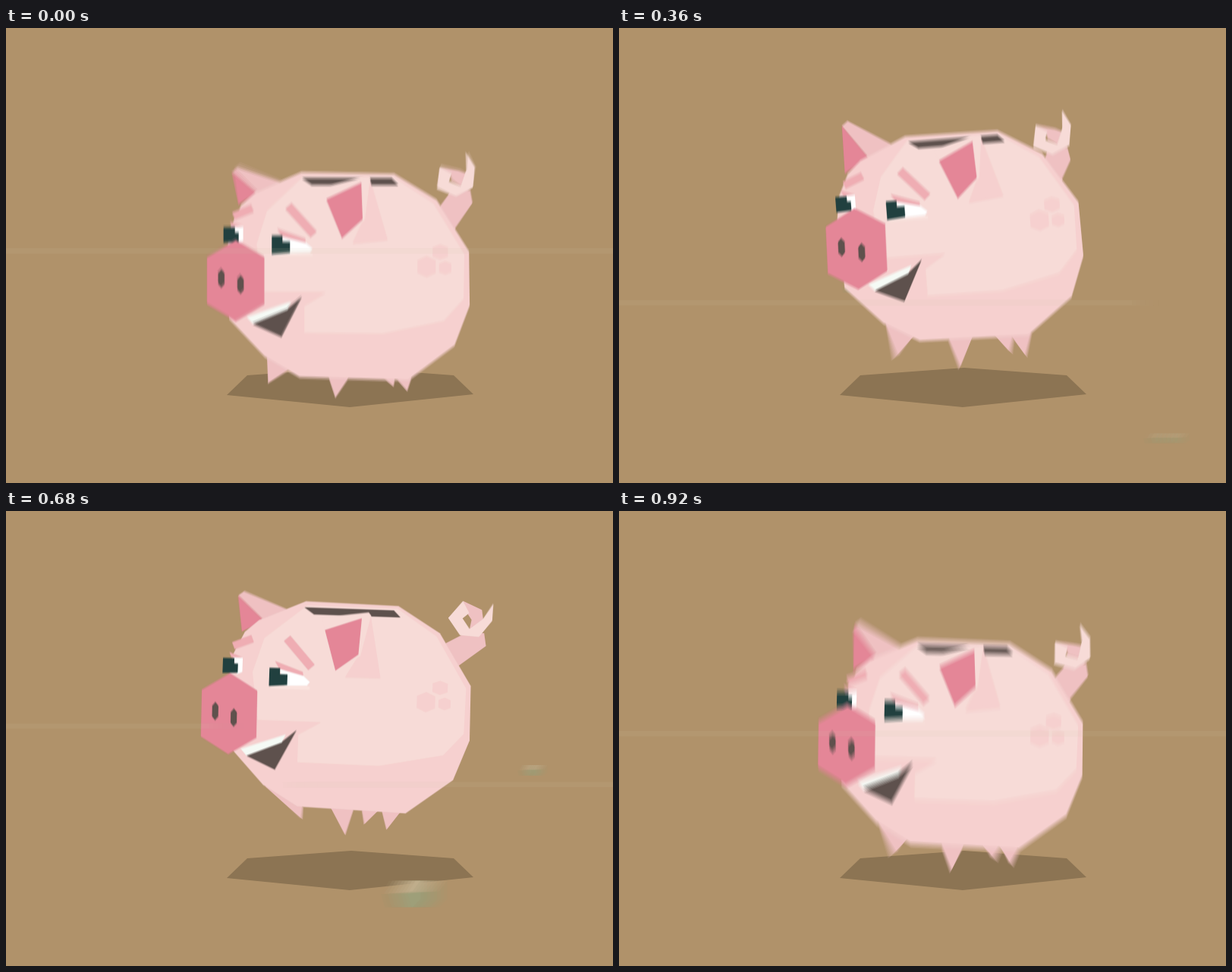
An HTML page with a canvas that plays this animation: 800 px wide and 600 px high, repeating every 0.96 s.

```html
<!DOCTYPE html>
<html lang="en">
<head>
<meta charset="utf-8">
<title>Running piggy bank</title>
<style>
  html, body { margin: 0; width: 100%; height: 100%; overflow: hidden; background: #b0926a; }
  canvas { display: block; width: 800px; height: 600px; }
</style>
</head>
<body>
<canvas id="stage" width="800" height="600"></canvas>
<script>
const LOOP = 960, HOP = LOOP / 2, STEP = 40, SHUTTER = 20, SAMPLES = 9;
const out = document.getElementById('stage').getContext('2d');
const buffer = document.createElement('canvas');
buffer.width = 800;
buffer.height = 600;
const ctx = buffer.getContext('2d');

const C = {
  ground: '#b0926a', shade: '#8c7453', skin: '#f6d0cf', light: '#f7dbd7',
  fold: '#efc1c2', rose: '#e48697', brow: '#efadb3', dark: '#5e514d', eye: '#21403f'
};
const wrap = t => ((t % LOOP) + LOOP) % LOOP;
const rad = deg => deg * Math.PI / 180;
const mix = (a, b, k) => a + (b - a) * k;
const clamp = (v, lo, hi) => Math.max(lo, Math.min(hi, v));

// Two hops per loop, the first tipping forward and the second back
function poseAt(t) {
  const u = (t % HOP) / HOP, cycle = 2 * Math.PI / LOOP;
  return {
    lift: 4 * u * (1 - u),
    tilt: (t < HOP ? -32 : 20) * u * u * (1 - u),
    nod: 12 * u * (1 - u) * (0.75 - u),
    flap: 12.7 * u ** 4 * (1 - u),
    turn: Math.sin(cycle * (t - 20)),
    stride: Math.cos(5 * cycle * t)
  };
}

function poly(color, ...p) {
  ctx.fillStyle = color;
  ctx.beginPath();
  for (let i = 0; i < p.length; i += 2) ctx.lineTo(p[i], p[i + 1]);
  ctx.closePath();
  ctx.fill();
}

function rect(color, x, y, w, h) {
  ctx.fillStyle = color;
  ctx.fillRect(x, y, w, h);
}

function hexagon(color, x, y, rx, ry) {
  const s = ry * 0.58;
  poly(color, x, y - ry, x + rx, y - s, x + rx, y + s, x, y + ry, x - rx, y + s, x - rx, y - s);
}

function group(draw, x, y, deg = 0, cx = 0, cy = 0, sx = 1) {
  ctx.save();
  ctx.translate(cx + x, cy + y);
  ctx.rotate(rad(deg));
  ctx.scale(sx, 1);
  ctx.translate(-cx, -cy);
  draw();
  ctx.restore();
}

const bar = (color, x, y, w, h, deg) =>
  group(() => rect(color, -w / 2, -h / 2, w, h), x, y, deg);

function drawRock(x, y, w, h) {
  const l = x - w / 2, r = x + w / 2, top = y - h / 2, end = y + h / 2;
  poly('#9e9f79', l, y, l + w * 0.2, top, r, top, r, y + h * 0.2, r - w * 0.2, end, l + w * 0.1, end);
  poly('#bfad8b', l, y, l + w * 0.2, top, r, top, r - w * 0.2, y - h * 0.1);
}

function drawRocks(t) {
  drawRock(1.19 * (t - 97), 342, 18, 14);
  drawRock(2.29 * (t - 45), 541, 20, 13);
  drawRock(1.97 * (t - 407), 505, 52, 35);
}

// A streak grows from the left edge, then leaves to the right
function drawStreak(t, base) {
  const head = Math.min(800, (t - 86) * 2.55), tail = Math.max(0, (t - 528) * 2.55);
  const y = base - 1.15e-4 * (t - 500) ** 2;
  if (head > tail) rect('rgba(205,196,166,.1)', tail, y - 3.8, head - tail, 7.6);
}

function drawTail({ lift, tilt, nod }) {
  const x = 594 + 10 * nod + 2.2 * tilt, y = 196 + 11 * lift, coil = 1 - nod;
  poly(C.fold, 564, 245, x - 8, y + 18, x + 17, y + 17, x + 20, y + 34, 584, 275);
  group(() => {
    // The loop closes as the tail curls up
    poly(C.fold, -11, -25, mix(14, 7, coil), mix(-13, -6, coil), 16, 8, -3, 12,
      mix(0, -9, coil), 0, -6, -9);
    poly(C.light, -11, -25, -31, -3, -16, 20, 9, 23, 27, 2, 29, -21, 15, -1, -3, 12, -12, -2, -3, -9);
  }, x, y, -36 * coil - tilt);
}

function drawLeg(x, reach, swing, { lift, flap, stride }) {
  poly(C.fold, x - 26, 436, x + swing * stride, reach + 8 * (lift + flap), x + 26, 436);
}

function drawLegs(pose) {
  drawLeg(370, 468, -25, pose);
  drawLeg(443, 487, -9, pose);
  drawLeg(493, 472, 18, pose);
  drawLeg(517, 478, 12, pose);
}

function drawFarEar({ lift, flap }) {
  const tip = [297 + 10 * flap, 190 - 20 * flap];
  const mid = [330 + 3 * lift + 6 * flap, 218 - 4 * flap];
  poly(C.fold, ...tip, tip[0] + 8, tip[1] - 6, mid[0] + 32, mid[1] - 15, mid[0] + 30, mid[1] + 10, ...mid);
  poly(C.rose, ...tip, ...mid, 306, 233);
}

function drawTorso({ turn }) {
  poly(C.skin, 389, 190, 511, 192, 567, 226, 610, 294, 611, 366, 591, 419, 530, 465, 387, 461,
    341, 434, 294, 384, 290, 300, 296, 262, 310, 233, 328, 217);
  // The front of the lit side slides with the head
  const slide = x => x + 10 * turn * clamp((590 - x) / 190, 0, 1);
  poly(C.light, 391, 195, 510, 195, 563, 230, 604, 297, 603, 358, 577, 387, slide(497), 404,
    slide(394), 403, slide(394), 366, slide(422), 349, slide(340), 349, slide(331), 285, slide(345), 240);
  group(() => poly(C.dark, 390, 198, 508, 198, 517, 207, 403, 207), 3 * turn, 0);
}

function drawFace({ turn, nod }) {
  const part = (px, py, draw) => group(draw, px * turn, py * nod);
  part(3, 3, () => {
    hexagon(C.skin, 554.5, 314.5, 12, 13);
    hexagon(C.skin, 572.5, 295, 10, 9);
    hexagon(C.skin, 579, 316, 8, 8);
  });
  part(5, 4, () => bar(C.brow, 312.5, 243, 27, 10, -22));
  part(5, 5.5, () => {
    poly(C.brow, 295, 255, 313, 262, 298, 262);
    poly('#fff', 301, 262, 313, 262, 313, 281, 306, 284);
    poly(C.eye, 287, 263, 302, 263, 302, 270, 307, 270, 307, 282, 287, 283);
  });
  part(7.5, 5, () => bar(C.brow, 389.5, 253.5, 50, 11, 48));
  part(7.5, 5.5, () => {
    rect('#fae3de', 353, 296, 52, 6);
    poly(C.brow, 358, 265, 395, 278, 396, 284, 364, 275);
    poly('#fff', 364, 275, 396, 283, 405, 291, 401, 296, 372, 297);
    poly(C.eye, 351, 274, 365, 274, 365, 282, 375, 282, 375, 296, 351, 298);
  });
  part(9, 6.5, () => {
    poly(C.dark, 391, 354, 364, 407, 326, 390, 371, 371);
    poly('#f5faf5', 318, 381, 377, 360, 372, 371, 326, 390);
  });
}

function drawNearEar({ turn, nod }) {
  group(() => {
    poly(C.skin, 480, 198, 504, 279, 458, 284, 471, 255);
    poly(C.light, 417, 210, 477, 195, 481, 199, 474, 254, 444, 277, 423, 226);
    poly(C.rose, 469, 204, 471, 252, 444, 277, 423, 226);
  }, 10 * turn, 4 * nod, 6 * nod, 451, 240);
}

function drawSnout({ turn, nod, tilt }) {
  group(() => {
    hexagon(C.rose, 304, 333, 38, 53.5);
    hexagon(C.dark, 285, 330, 4.2, 12);
    hexagon(C.dark, 310.5, 338, 4.2, 12);
  }, 12 * turn, 9 * nod, -0.4 * tilt, 304, 333, 1 + 0.04 * turn);
}

function drawScene(time) {
  const t = wrap(time), pose = poseAt(t);
  rect(C.ground, 0, 0, 800, 600);
  poly(C.shade, 291, 484, 318, 458, 455, 448, 590, 458, 616, 483, 453, 500);
  drawRocks(t);
  group(() => {
    for (const draw of [drawTail, drawLegs, drawFarEar, drawTorso, drawFace, drawNearEar, drawSnout]) draw(pose);
  }, -1.5 * pose.turn, 3 - 74 * pose.lift, pose.tilt, 450, 330);
  drawStreak(t, 364.5);
  drawStreak(wrap(t - HOP), 294);
}

// Motion blur: running average of several moments
function render(t) {
  for (let i = 0; i < SAMPLES; i++) {
    drawScene(t + ((i + 0.5) / SAMPLES - 0.5) * SHUTTER);
    out.globalAlpha = 1 / (i + 1);
    out.drawImage(buffer, 0, 0);
  }
}

const start = performance.now();
let shown = -1;
function tick() {
  const t = Math.floor(wrap(performance.now() - start) / STEP) * STEP;
  if (t !== shown) render(shown = t);
  requestAnimationFrame(tick);
}
tick();
</script>
</body>
</html>
```
